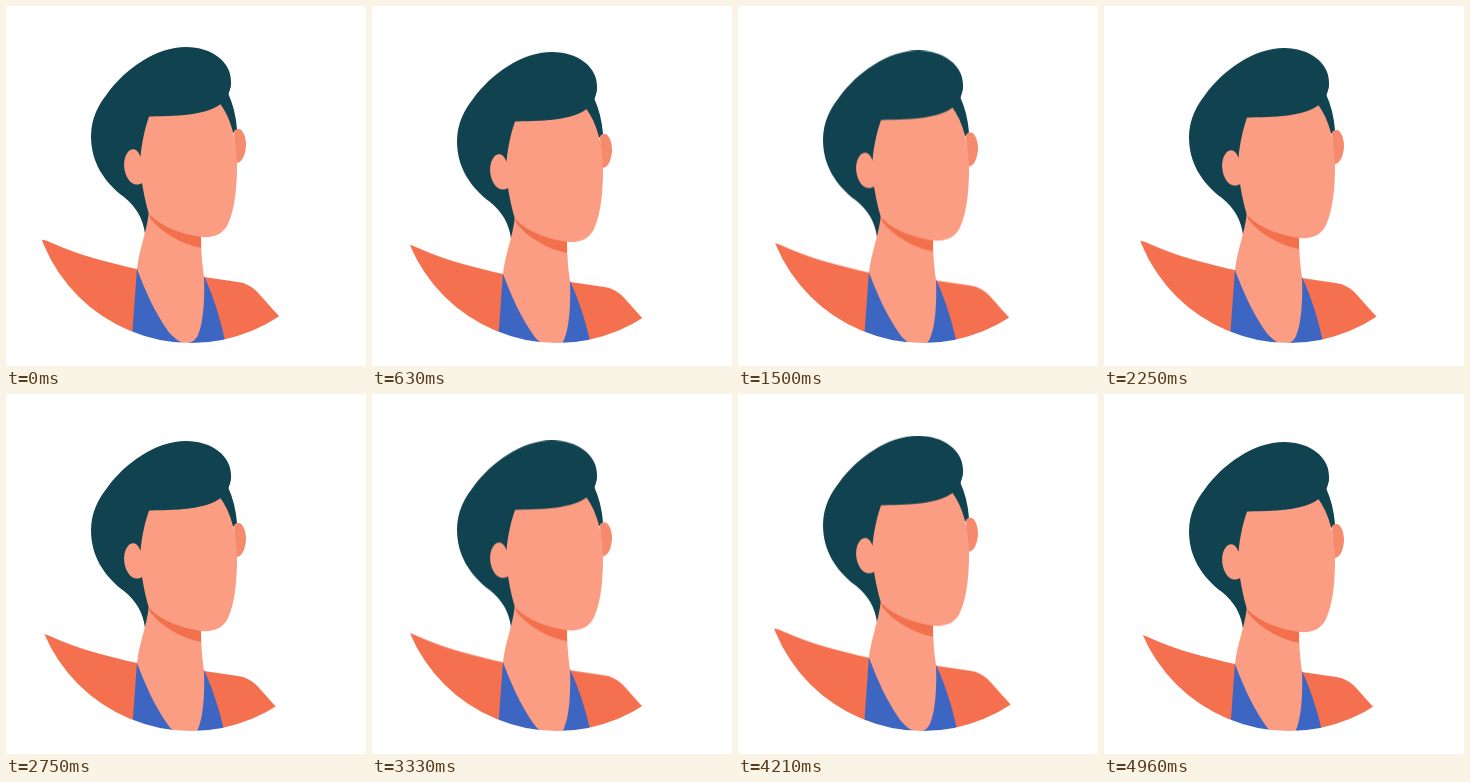
Animation of 360x360 px, one loop 5 s. Source, as an HTML page:

```html
<!DOCTYPE html>
<html lang="en">
<head>
<meta charset="utf-8">
<title>Bobbing portrait</title>
<style>
  html, body { margin: 0; width: 100%; height: 100%; overflow: hidden; background: #fff; }
  svg { display: block; width: 100vw; height: 100vh; }
  .hair { fill: #10434f; }
  .skin { fill: #fb9d83; }
  .shade { fill: #f2714c; }
  .ear { fill: #f58a6c; }
  .jacket { fill: #f4704f; }
  .shirt { fill: #3d66c2; }

  /* Two and a half bobs, then a hard cut back to the top */
  .bob { animation: bob 5s cubic-bezier(.364, 0, .636, 1) infinite; }
  @keyframes bob {
    0%, 40%, 80% { transform: translateY(0); }
    20%, 60%, 100% { transform: translateY(7px); }
  }
</style>
</head>
<body>
<svg viewBox="0 0 360 360">
  <clipPath id="disc"><circle cx="185" cy="177.5" r="159.5"/></clipPath>
  <g clip-path="url(#disc)">
    <g class="bob">
      <path class="jacket" d="M20 232 C34 233 40 234 46 237 C72 249 104 257 131 263 L198 271 L232 276 C247 278 253 288 262 298 L290 329 V350 H20 Z"/>
      <path class="shirt" d="M131 262 L125 345 H221 C216 318 209 294 198 270 Z"/>
      <path class="hair" d="M180 41 C206 41 225 56 225 75 C225 81 224 84 222 87 C227 98 230 110 231 123 L226 128 L150 200 L139 228 C137 212 130 201 118 191 C98 176 85 156 85 130 C85 112 93 98 101 88 C119 63 150 41 180 41 Z"/>
      <path class="skin" d="M143 205 C141 226 133 243 131 263 C139 284 148 305 162 325 C174 340 186 341 192 329 C197 318 199 295 198 271 C196 256 195 245 195 228 Z"/>
      <path class="shade" d="M143 206 L144 212 C157 228 176 238 195 242 V228 Z"/>
      <path class="ear" d="M228 125 C235 119 240 128 240 140 C239 151 235 158 229 157 Z"/>
      <path class="skin" d="M145 105 C139 121 136 135 134.500 151 C132 143 126 141 122 146 C117 152 117 163 121 171 C125 179 131 180 136 177 C138 189 140 198 143 208 C158 223 177 228 195 231 C209 232 217 228 222 218 C229 203 231 180 231 160 C231 136 226 113 213 96 Z"/>
      <path class="hair" d="M140 110.500 C169 110 201 110 216 97 C221 93 224 87 225 76 L190 60 L140 80 Z"/>
    </g>
  </g>
</svg>
</body>
</html>
```
